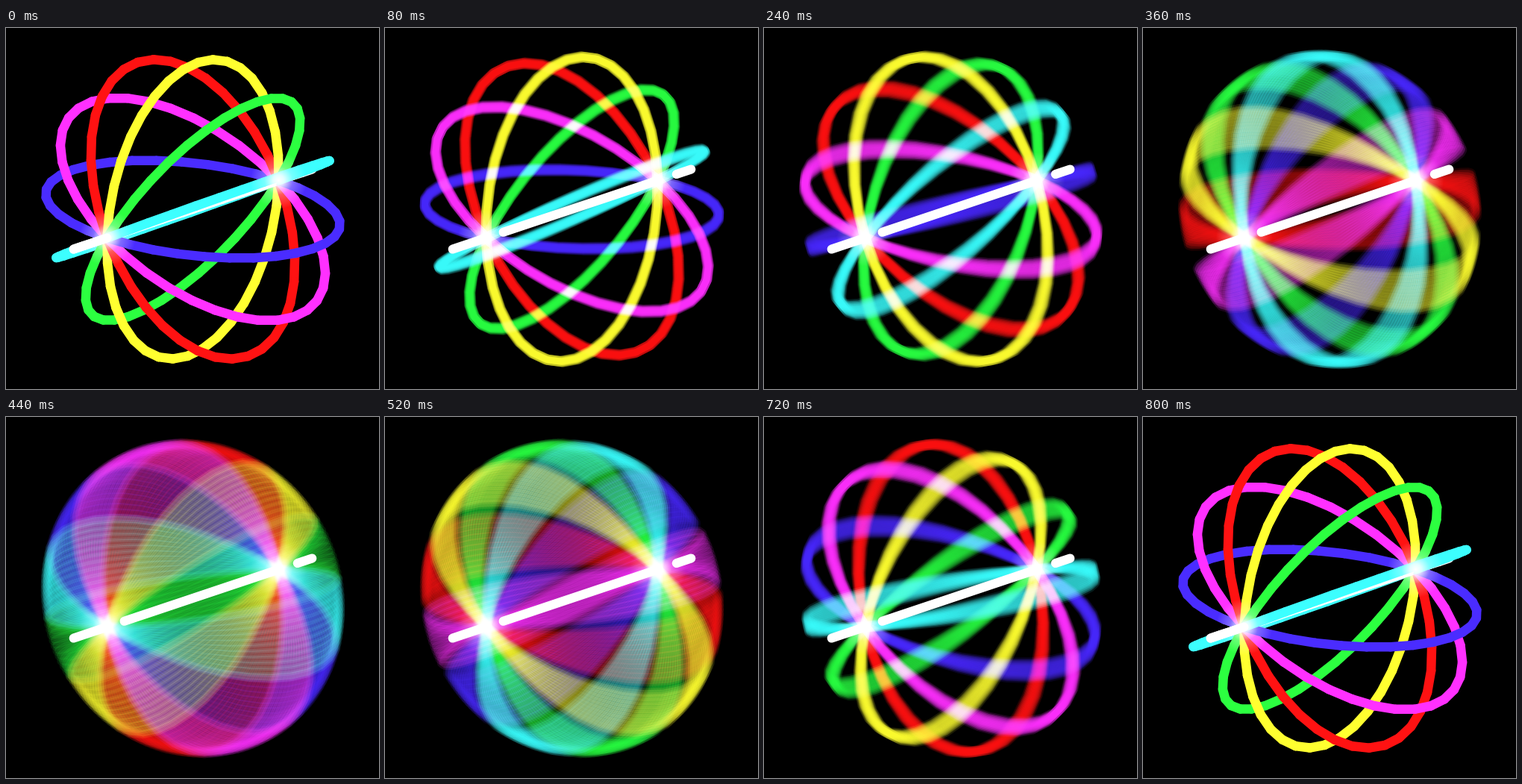
Recreate the animation shown at these times as an HTML page with a canvas. Size 500 by 484 pixels, loop 0.84 s.

```html
<!DOCTYPE html>
<html>
<head>
<meta charset="utf-8">
<style>
html, body { margin: 0; height: 100%; overflow: hidden; background: #000; }
canvas { display: block; }
</style>
</head>
<body>
<canvas id="stage" width="500" height="484"></canvas>
<script>
const STEP = 40, LOOP = 840, LAST = 800, SHUTTER = 26;
const SAMPLES = 12, SEGMENTS = 36, RAD = Math.PI / 180;
const CENTER = [250.5, 243];

// Projected basis [x, y, depth]: the pole axis and two equator directions.
const POLE = [115, -38.5, 162], U = [142.5, -52.5, -120], V = [-74, -197, 0];
const COLORS = ['#3cffff', '#2cff40', '#ffff30', '#ff1212', '#ff30ff', '#4a2cff'];

// [ms, degrees turned, degrees per step]
const KEYS = [[0, 0, 2], [160, 12, 4.5], [240, 24.5, 9], [360, 74, 27],
  [520, 237, 37], [640, 315, 24], [800, 360, 0]];

const ctx = stage.getContext('2d');
const layer = document.createElement('canvas');
layer.width = 500;
layer.height = 484;
const lctx = layer.getContext('2d');
for (const c of [ctx, lctx]) c.lineCap = c.lineJoin = 'round';

function turn(ms) {
  const i = Math.max(1, KEYS.findIndex(k => k[0] >= ms));
  const [t0, a0, v0] = KEYS[i - 1], [t1, a1, v1] = KEYS[i];
  const n = (t1 - t0) / STEP, x = (ms - t0) / (t1 - t0), y = 1 - x;
  return a0 * (1 + 2 * x) * y * y + v0 * n * x * y * y
       + a1 * (3 - 2 * x) * x * x - v1 * n * x * x * y;
}

function ringPoint(theta, phi) {
  const c = Math.cos(phi * RAD), s = Math.sin(phi * RAD);
  const ct = Math.cos(theta * RAD), st = Math.sin(theta * RAD);
  return POLE.map((p, i) => c * p + s * (ct * U[i] + st * V[i]));
}

function line(c, points, width, color) {
  c.beginPath();
  for (const [x, y] of points) c.lineTo(CENTER[0] + x, CENTER[1] + y);
  c.lineWidth = width;
  c.strokeStyle = color;
  c.stroke();
}

const ring = theta =>
  Array.from({ length: SEGMENTS + 1 }, (_, i) => ringPoint(theta, i * 360 / SEGMENTS));

const onAxis = k => POLE.map(p => p * k);
const rod = (from, to) => line(ctx, [onAxis(from), onAxis(to)], 12, '#fff');

// Sharp pose: opaque pieces painted from back to front.
function drawStill() {
  const pieces = [];
  const add = (points, width, color) => {
    for (let i = 1; i < points.length; i++) {
      const [a, b] = [points[i - 1], points[i]];
      pieces.push({ a, b, width, color, z: a[2] + b[2] });
    }
  };
  COLORS.forEach((color, i) => add(ring(i * 30), 12.5, color));
  add(Array.from({ length: 25 }, (_, i) => onAxis(1.39 - i * 2.78 / 24)), 12, '#fff');
  pieces.sort((p, q) => q.z - p.z);
  for (const p of pieces) line(ctx, [p.a, p.b], p.width, p.color);
}

// Moving pose: each ring is smeared over the shutter time, then all are screened.
function drawMoving(ms) {
  const from = turn(ms - SHUTTER / 2), to = turn(ms + SHUTTER / 2);
  ctx.globalCompositeOperation = 'screen';
  COLORS.forEach((color, i) => {
    lctx.clearRect(0, 0, 500, 484);
    for (let s = 0; s < SAMPLES; s++) {
      const points = ring(i * 30 + from + (to - from) * s / (SAMPLES - 1));
      lctx.globalAlpha = 0.11;
      line(lctx, points, 14, color);
      lctx.globalAlpha = 0.17;
      line(lctx, points, 9, color);
    }
    ctx.drawImage(layer, 0, 0);
  });
  ctx.globalCompositeOperation = 'source-over';
  rod(-0.8, 1);
  rod(1.22, 1.39);
}

function glow(k) {
  const x = CENTER[0] + POLE[0] * k, y = CENTER[1] + POLE[1] * k;
  const g = ctx.createRadialGradient(x, y, 0, x, y, 38);
  g.addColorStop(0, '#fff');
  g.addColorStop(0.2, 'rgba(255,255,255,.85)');
  g.addColorStop(0.5, 'rgba(255,255,255,.3)');
  g.addColorStop(1, 'rgba(255,255,255,0)');
  ctx.globalCompositeOperation = 'source-atop';
  ctx.fillStyle = g;
  ctx.fillRect(x - 38, y - 38, 76, 76);
  ctx.globalCompositeOperation = 'source-over';
}

function draw(ms) {
  ctx.clearRect(0, 0, 500, 484);
  if (ms % LAST === 0) drawStill();
  else drawMoving(ms);
  glow(-1);
  glow(1);
  rod(-1.39, -1);
}

let start, shown = -1;
function frame(now) {
  start ??= now;
  const ms = Math.floor((now - start) % LOOP / STEP) * STEP;
  if (ms !== shown) draw(shown = ms);
  requestAnimationFrame(frame);
}
requestAnimationFrame(frame);
</script>
</body>
</html>
```
